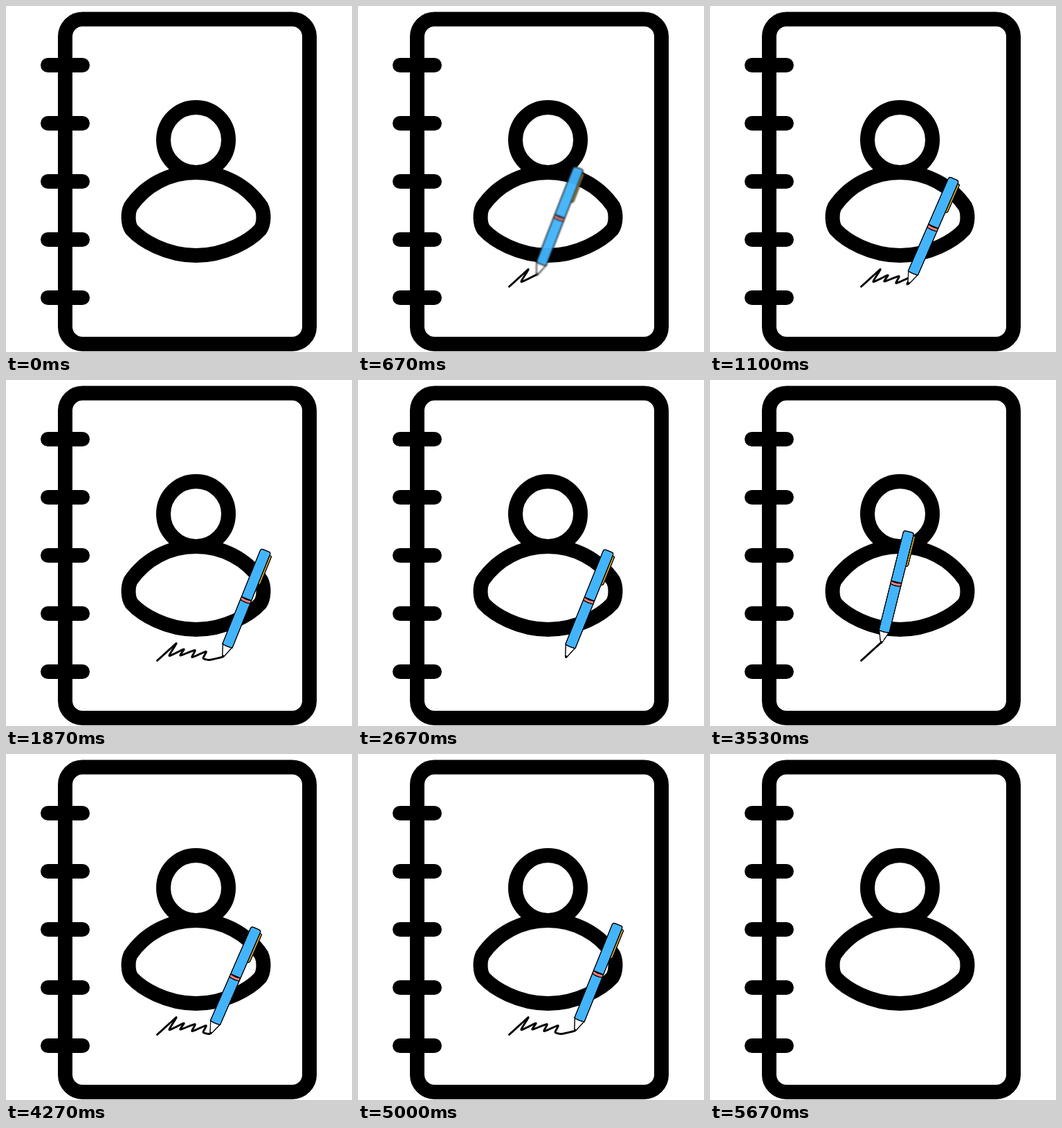
An HTML page with a canvas for the animation above (6230 ms loop, 500x500 px).

```html
<!DOCTYPE html>
<html lang="en">
<head>
<meta charset="utf-8">
<title>Signing a notebook</title>
<style>
html, body { margin: 0; width: 100%; height: 100%; overflow: hidden; background: #fff; }
canvas { display: block; width: 500px; height: 500px; }
</style>
</head>
<body>
<canvas id="stage" width="500" height="500"></canvas>
<script>
const ctx = document.getElementById('stage').getContext('2d');
const LOOP = 6230, CYCLE = 3100, WRITE_END = 1400;
const BLUE = '#43b4fb', GOLD = '#d8a42e', PINK = '#f27c7c';

// Pen tip while writing: time, x, y, tilt in degrees
const KEYS = [
  [0, 218.5, 405.5, 22], [430, 246, 380.5, 14], [550, 236, 398.5, 19],
  [670, 257, 389, 21.3], [740, 252, 398, 22.5], [850, 273, 390.5, 23],
  [930, 269, 400.5, 23], [1030, 289, 392.5, 23], [1100, 285, 402, 23.5],
  [1170, 294, 404.5, 23.5], [WRITE_END, 312, 400.5, 22]
];
const HOME = KEYS[0], END = KEYS[KEYS.length - 1];
const CURVE = 0.3;

const clamp = v => Math.max(0, Math.min(1, v));
const ramp = (t, a, b) => clamp((t - a) / (b - a));
const lerp = (a, b, p) => a + (b - a) * p;
const smooth = p => p * p * (3 - 2 * p);

// Slope through key i, flat at both ends
function slope(i, k) {
  const before = KEYS[i - 1], after = KEYS[i + 1];
  return before && after ? CURVE * (after[k] - before[k]) : 0;
}

function tipAt(u) {
  u = Math.max(0, Math.min(WRITE_END, u));
  let i = 0;
  while (i < KEYS.length - 2 && u > KEYS[i + 1][0]) i++;
  const a = KEYS[i], b = KEYS[i + 1];
  const p = ramp(u, a[0], b[0]);
  if (i === 0) {
    const q = p * p;
    return { x: lerp(a[1], b[1], q), y: lerp(a[2], b[2], q), tilt: lerp(a[3], b[3], q) };
  }
  const q = 1 - p;
  const value = k => lerp(a[k], b[k], smooth(p)) +
    p * q * q * slope(i, k) - p * p * q * slope(i + 1, k);
  return { x: value(1), y: value(2), tilt: value(3) };
}

function shape(c, d, fill, width) {
  const p = new Path2D(d);
  if (fill) { c.fillStyle = fill; c.fill(p); }
  if (width) { c.lineWidth = width; c.stroke(p); }
}

// Upright pen, tip at (30, 185), drawn at double size
function makePen() {
  const pen = document.createElement('canvas');
  pen.width = 120;
  pen.height = 400;
  const c = pen.getContext('2d');
  c.scale(2, 2);
  c.translate(30, 185);
  c.lineJoin = c.lineCap = 'round';
  c.strokeStyle = '#000';
  shape(c, 'M7.5 -163 L10.8 -162 L10.8 -120 Q9.5 -116 7.5 -118 Z', GOLD, 1.3);
  shape(c, 'M-7 -18 L7 -18 L0.7 -1 L-0.7 -1 Z', '#fff', 1.3);
  shape(c, 'M-1.6 -4 L1.6 -4 L0 0 Z', '#000');
  shape(c, 'M-7.7 -88 L7.7 -88 L7.7 -18.5 Q0 -17 -7.7 -18.5 Z', BLUE, 1.4);
  shape(c, 'M-7.7 -92 L-7.7 -163.5 Q-7.7 -167 -4.2 -167 L4.2 -167 Q7.7 -167 7.7 -163.5 L7.7 -92 Z', BLUE, 1.4);
  shape(c, 'M-7.7 -92 Q0 -90 7.7 -92 L7.7 -87.5 Q0 -85.5 -7.7 -87.5 Z', PINK, 1.4);
  return pen;
}
const pen = makePen();

const BODY = new Path2D(
  'M274.5 240.5 C236 240.5 201 259 180 290 C175.8 299 175.8 314 181.5 323 ' +
  'C196 339 232 360.5 274.5 360.5 C317 360.5 353 339 367.5 323 ' +
  'C373.2 314 373.2 299 369 290 C348 259 313 240.5 274.5 240.5 Z');

function drawNotebook() {
  ctx.strokeStyle = '#000';
  ctx.lineCap = ctx.lineJoin = 'round';
  ctx.lineWidth = 21;
  ctx.beginPath();
  ctx.roundRect(85.5, 19, 353, 469.5, 25);
  ctx.stroke();
  for (let i = 0; i < 5; i++) {
    const y = 85.5 + 84 * i;
    ctx.beginPath();
    ctx.moveTo(60.5, y);
    ctx.lineTo(110.5, y);
    ctx.stroke();
  }
  ctx.beginPath();
  ctx.arc(274.5, 193.5, 47, 0, Math.PI * 2);
  ctx.stroke();
  ctx.stroke(BODY);
}

function drawInk(u, alpha) {
  if (u <= 0 || alpha <= 0) return;
  const end = Math.min(u, WRITE_END);
  ctx.globalAlpha = alpha;
  ctx.lineWidth = 2.9;
  ctx.beginPath();
  ctx.moveTo(HOME[1], HOME[2]);
  for (let t = 5; t < end; t += 5) {
    const p = tipAt(t);
    ctx.lineTo(p.x, p.y);
  }
  const p = tipAt(end);
  ctx.lineTo(p.x, p.y);
  ctx.stroke();
  ctx.globalAlpha = 1;
}

function drawPen(p, alpha, blur) {
  if (alpha <= 0) return;
  ctx.save();
  ctx.globalAlpha = alpha;
  if (blur > 0.05) ctx.filter = `blur(${blur.toFixed(2)}px)`;
  ctx.translate(p.x + 1, p.y + 0.8);
  ctx.rotate(p.tilt * Math.PI / 180);
  ctx.drawImage(pen, -30, -185, 60, 200);
  ctx.restore();
}

function draw(t) {
  ctx.fillStyle = '#fff';
  ctx.fillRect(0, 0, 500, 500);
  drawNotebook();
  if (t < 30) return;

  const second = t >= 3000;
  const u = second ? t - CYCLE : t;
  const fade = 1 - ramp(u, 2050, 2570);
  let tip = tipAt(u), alpha = 1, blur = 0;

  if (second) {
    alpha = fade;
  } else {
    alpha = ramp(t, 0, 700);
    blur = 4 * (1 - ramp(t, 0, 900));
    const back = smooth(ramp(t, 2570, 3000));
    if (back > 0) {
      tip = {
        x: lerp(END[1], HOME[1], back),
        y: lerp(END[2], HOME[2], back),
        tilt: END[3]
      };
    }
  }
  drawInk(u, fade);
  drawPen(tip, alpha, blur);
}

const start = performance.now();
function frame() {
  draw((performance.now() - start) % LOOP);
  requestAnimationFrame(frame);
}
draw(0);
requestAnimationFrame(frame);
</script>
</body>
</html>
```
